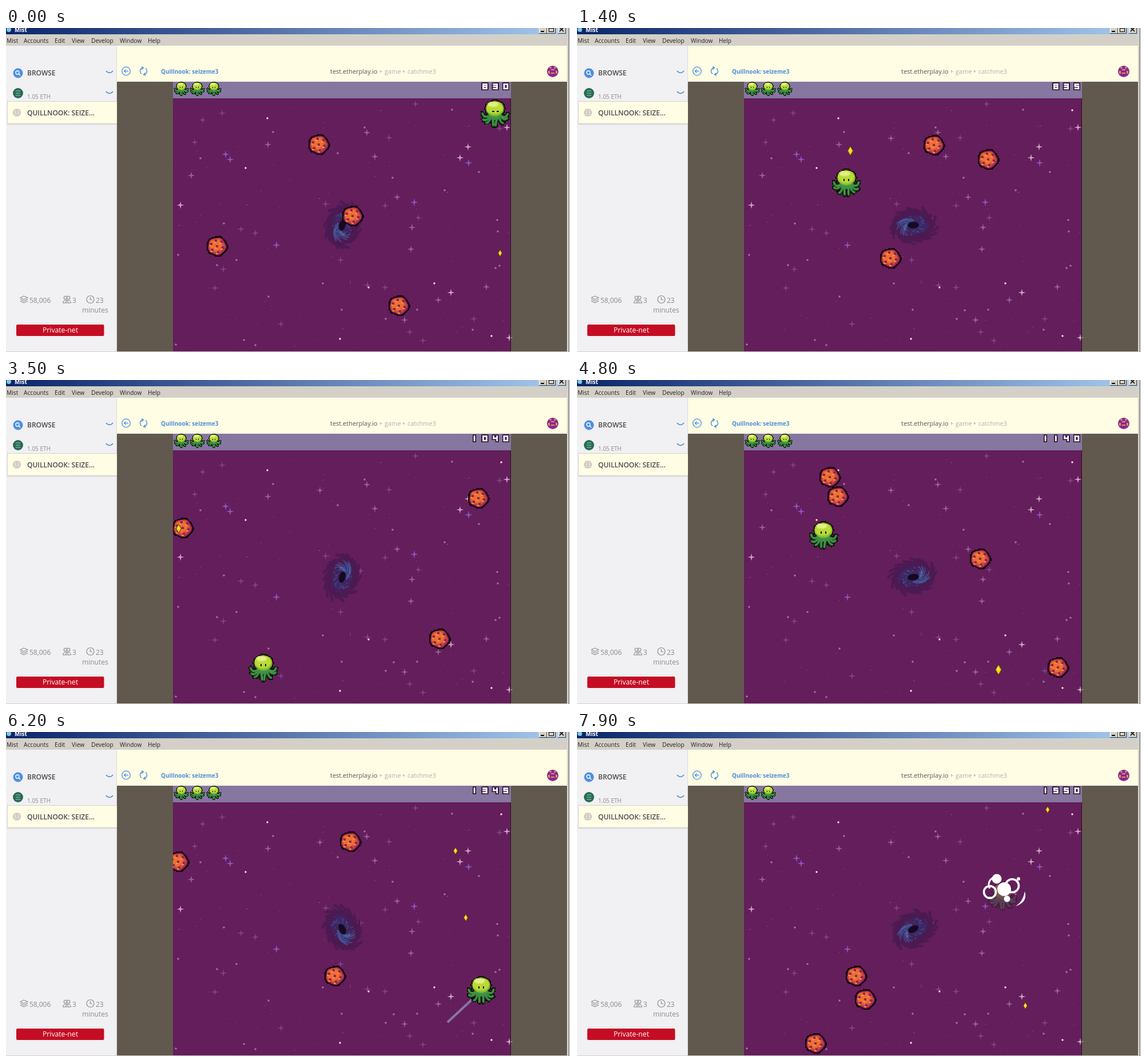
Recreate the animation shown at these times as an HTML page with a canvas. Size 988 by 567 pixels, loop 8 s.

```html
<!DOCTYPE html>
<html lang="en">
<head>
<meta charset="utf-8">
<title>Mist</title>
<style>
  html, body { margin: 0; width: 100%; height: 100%; overflow: hidden; background: #fff; }
  canvas, svg { position: absolute; left: 0; top: 0; width: 988px; height: 567px; }
  text { font-family: "Open Sans", "Noto Sans", sans-serif; white-space: pre; }
</style>
</head>
<body>
<canvas id="stage" width="988" height="567"></canvas>
<svg viewBox="0 0 988 567">
  <g font-size="10.2" fill="#222">
    <text x="15" y="7" font-weight="700" font-size="10" fill="#fff">Mist</text>
    <text x="1" y="26">Mist</text>
    <text x="31" y="26">Accounts</text>
    <text x="85" y="26">Edit</text>
    <text x="115" y="26">View</text>
    <text x="149" y="26">Develop</text>
    <text x="199" y="26">Window</text>
    <text x="248" y="26">Help</text>
  </g>
  <g font-size="12" font-weight="600" fill="#4a4a4e">
    <text x="37" y="83">BROWSE</text>
    <text x="37" y="153">QUILLNOOK: SEIZE…</text>
  </g>
  <g font-size="12" fill="#8d8a8a">
    <text x="37" y="124" font-size="10">1.05 ETH</text>
    <text x="41" y="480.5">58,006</text>
    <text x="116" y="480.5">3</text>
    <text x="157" y="480.5">23</text>
    <text x="133" y="498">minutes</text>
    <text x="64" y="533" font-size="12.2" fill="#fff">Private-net</text>
  </g>
  <g font-size="11">
    <text x="271" y="80" font-size="10" font-weight="700" fill="#4f8ad8">Quillnook: seizeme3</text>
    <text x="567" y="80" fill="#55555c">test.etherplay.io</text>
    <text x="662" y="80" fill="#b3aebb">game</text>
    <text x="702" y="80" fill="#b3aebb">catchme3</text>
  </g>
</svg>
<script>
const ctx = document.getElementById('stage').getContext('2d');
const TAU = Math.PI * 2;
const LOOP = 8000, STEP = 100;
const HOLE = { x: 588, y: 345 };

function layer(w, h, draw) {
  const c = document.createElement('canvas');
  c.width = w;
  c.height = h;
  draw(c.getContext('2d'));
  return c;
}

// Low-resolution sprite with hard pixel edges
function sprite(w, h, draw) {
  return layer(w, h, g => {
    draw(g);
    const img = g.getImageData(0, 0, w, h);
    for (let i = 3; i < img.data.length; i += 4) img.data[i] = img.data[i] > 110 ? 255 : 0;
    g.putImageData(img, 0, 0);
  });
}

function rect(g, color, x, y, w, h) {
  g.fillStyle = color;
  g.fillRect(x, y, w, h);
}

function disc(g, color, x, y, rx, ry = rx) {
  g.fillStyle = color;
  g.beginPath();
  g.ellipse(x, y, rx, ry, 0, 0, TAU);
  g.fill();
}

function line(g, color, width, ...pts) {
  g.strokeStyle = color;
  g.lineWidth = width;
  g.beginPath();
  for (let i = 0; i < pts.length; i += 2) g.lineTo(pts[i], pts[i + 1]);
  g.stroke();
}

function ring(g, color, width, x, y, r, a = 0, b = TAU) {
  g.strokeStyle = color;
  g.lineWidth = width;
  g.beginPath();
  g.arc(x, y, r, a, b);
  g.stroke();
}

function random(seed) {
  return () => (seed = (seed * 16807) % 2147483647) / 2147483647;
}

// ---- sprites ----
// Arm tips fan out over an ellipse, mirrored about the middle
function octopus(phase, blink) {
  return sprite(27, 25, g => {
    g.lineCap = 'round';
    const arms = (color, width) => {
      g.strokeStyle = color;
      g.lineWidth = width;
      for (const side of [-1, 1]) for (let i = 0; i < 4; i++) {
        const a = -0.2 + 0.55 * i + 0.07 * Math.sin(phase + i * 2 + side);
        const bend = a + 0.6 - 0.2 * i;
        g.beginPath();
        g.moveTo(13.5 + side * (5 - i), 14);
        g.quadraticCurveTo(13.5 + side * 10.5 * Math.cos(bend), 14 + 8 * Math.sin(bend),
          13.5 + side * 11.2 * Math.cos(a), 14 + 8.8 * Math.sin(a));
        g.stroke();
      }
    };
    arms('#0a0d08', 4);
    disc(g, '#0a0d08', 13.5, 8, 9.1, 7.8);
    disc(g, '#0a0d08', 13.5, 15, 7, 5);
    arms('#2f8148', 2.1);
    arms('#5fb03c', 0.8);
    disc(g, '#3c9347', 13.5, 14.6, 5.8, 3.4);
    disc(g, '#8cbf30', 13.5, 8.1, 8, 6.7);
    disc(g, '#b9da37', 13.2, 7.2, 7.4, 5.6);
    disc(g, '#e2ef82', 12, 4.2, 4.6, 2.3);
    for (const x of [11, 15]) rect(g, '#111', x, blink ? 10 : 9, blink ? 2 : 1, blink ? 1 : 2);
  });
}

const poses = [0, 1, 2, 3].map(i => octopus(i * TAU / 4));
const blinkPose = octopus(1, true);

const rock = sprite(20, 20, g => {
  const blob = (color, r, shift) => {
    g.fillStyle = color;
    g.beginPath();
    for (let a = 0; a < TAU; a += 0.2) {
      const k = r + 0.35 * Math.sin(5 * a + 1);
      g.lineTo(10 - shift + k * Math.cos(a), 10 - shift + k * Math.sin(a) * 0.96);
    }
    g.fill();
  };
  blob('#120510', 9.3, 0);
  blob('#a92f58', 7.9, 0);
  blob('#d94f3a', 6.9, 0.5);
  blob('#ee7030', 5.2, 1);
  for (let i = 0; i < 7; i++) {
    const a = i * TAU / 6 + 0.3, r = i < 6 ? 5.3 : 0;
    const x = Math.round(8.8 + r * Math.cos(a)), y = Math.round(8.8 + r * Math.sin(a));
    rect(g, '#8a2759', x, y, 2, 2);
    rect(g, '#f7943f', x - 1, y + 2, 2, 1);
  }
});

const hole = layer(100, 100, g => {
  const rnd = random(77);
  g.translate(50, 50);
  g.scale(1, 0.78);
  g.lineCap = 'round';
  const arm = (color, width, start, r0, r1, sweep) => {
    g.strokeStyle = color;
    g.lineWidth = width;
    g.beginPath();
    for (let k = 0; k <= 1.001; k += 0.1) {
      const a = start - sweep * k, r = r0 + (r1 - r0) * k;
      g.lineTo(r * Math.cos(a), r * Math.sin(a));
    }
    g.stroke();
  };
  disc(g, '#501b55', 0, 0, 36);
  for (let i = 0; i < 26; i++) arm('#4c1a52', 5, i * TAU / 26 + rnd() * 0.3, 20, 34 + rnd() * 10, 0.9);
  disc(g, '#41235f', 0, 0, 22);
  for (let i = 0; i < 40; i++) {
    const side = (i % 2) * Math.PI;
    arm(['#3a3576', '#3d4b8c', '#3a2a68', '#4a66a3'][i % 4], 1.1, side + rnd() * 1.7, 10, 16 + rnd() * 14, 1.1);
  }
  for (let i = 0; i < 30; i++) {
    const a = rnd() * TAU, r = 10 + rnd() * 13;
    rect(g, i % 4 ? '#5d86bd' : '#a9c9e4', r * Math.cos(a), r * Math.sin(a), 1.1, 1.3);
  }
  disc(g, '#150a20', 0, 0, 10, 7.2);
});

// ---- star field ----
function star(g, color, x, y, r) {
  g.fillStyle = color;
  g.beginPath();
  for (let i = 0; i < 8; i++) {
    const a = i * TAU / 8, k = i % 2 ? r * 0.27 : r;
    g.lineTo(x + k * Math.cos(a), y + k * Math.sin(a));
  }
  g.fill();
}

function space(g) {
  rect(g, '#641e5b', 292, 94, 591, 473);
  const rnd = random(4242);
  const scatter = (n, put) => {
    for (let i = 0; i < n; i++) put(Math.round(296 + rnd() * 582), Math.round(130 + rnd() * 430), i);
  };
  scatter(170, (x, y, i) => rect(g, ['#a12c5e', '#d8466a', '#87336f', '#943a6c'][i % 4], x, y, i % 5 ? 1 : 2, 1));
  scatter(32, (x, y, i) => star(g, i % 3 ? '#7d4287' : '#98609a', x, y, 6.5));
  scatter(26, (x, y) => disc(g, '#a56fa0', x, y, 1.8));
  scatter(8, (x, y) => {
    disc(g, '#d4436f', x, y, 2);
    disc(g, '#fff0f0', x, y, 1.4);
  });
  for (const [x, y] of [[384, 221], [392, 230], [809, 236], [714, 305], [473, 380]]) star(g, '#8a55bd', x, y, 7);
  for (const [x, y] of [[876, 174], [808, 208], [794, 227], [305, 310], [778, 463], [880, 542]]) star(g, '#cfa3c6', x, y, 6.5);
}

// ---- static window ----
function chevron(g, y) {
  g.strokeStyle = '#3f93d6';
  g.lineWidth = 1.5;
  g.beginPath();
  g.moveTo(175, y - 2);
  g.quadraticCurveTo(181, y + 5, 187, y - 2);
  g.stroke();
}

function windowButton(g, x, w) {
  rect(g, '#404040', x, -4, w, 14);
  rect(g, '#fff', x, -4, w - 1, 13);
  rect(g, '#d4d0c8', x + 1, -3, w - 2, 12);
}

function sidebar(g) {
  rect(g, '#f1f0f2', 0, 31, 194, 536);
  rect(g, '#dfdce0', 193, 31, 1, 536);

  disc(g, '#4b90e2', 21, 79, 8.5);
  ring(g, '#fff', 1.3, 20, 78, 3);
  line(g, '#fff', 1.5, 22, 80, 25, 83);
  disc(g, '#2c6a53', 21, 114, 9);
  for (const y of [109, 113, 117]) rect(g, '#5ba088', 17, y, 8, 2);
  chevron(g, 77);
  chevron(g, 113);

  rect(g, '#d3d0d8', 2, 128, 192, 41);
  rect(g, '#fffde4', 3, 129, 191, 38);
  disc(g, '#c2c0bd', 19, 148, 7);
  for (const k of [-3, 0, 3]) line(g, '#f6f4e0', 0.8, 13, 148 + k, 25, 148 + k);
  g.beginPath();
  g.ellipse(19, 148, 3, 7, 0, 0, TAU);
  g.stroke();

  const ink = '#8d8a8a';
  line(g, ink, 1.1, 25, 472, 31, 469, 38, 472, 31, 475, 25, 472);
  for (const y of [475, 478]) line(g, ink, 1.1, 25, y, 31, y + 3, 38, y);
  for (const x of [109, 104]) {
    ring(g, ink, 1.1, x, 472, 2.8);
    ring(g, ink, 1.1, x, 481, 4.5, Math.PI, TAU);
  }
  line(g, ink, 1.1, 99, 481, 114, 481);
  ring(g, ink, 1.2, 147.5, 475, 6.5);
  line(g, ink, 1.2, 147.5, 471, 147.5, 475.5, 151, 475.5);

  g.fillStyle = '#c40d24';
  g.beginPath();
  g.roundRect(18, 519, 153.5, 20, 2);
  g.fill();
}

function toolbar(g) {
  rect(g, '#fffde4', 194, 31, 787, 63);
  const blue = '#4a8fe0';
  ring(g, blue, 1.3, 210, 75.5, 7.3);
  line(g, blue, 1.3, 214, 75.5, 206.5, 75.5);
  line(g, blue, 1.3, 209.5, 72.5, 206.5, 75.5, 209.5, 78.5);
  for (const s of [1, -1]) {
    const turn = s > 0 ? 0 : Math.PI;
    ring(g, blue, 1.4, 240.5, 75.5, 6, 2.2 + turn, 4.6 + turn);
    line(g, blue, 1.4, 240.5 - 3.5 * s, 75.5 - 8 * s, 240.5, 75.5 - 6 * s, 240.5 - 3 * s, 75.5 - 3 * s);
  }
  g.fillStyle = '#c5c0cc';
  for (const x of [654, 694]) {
    g.beginPath();
    g.moveTo(x, 73.5);
    g.lineTo(x + 4, 76);
    g.lineTo(x, 78.5);
    g.fill();
  }
  disc(g, '#8a2a86', 956, 76, 10);
  for (const s of [-1, 1]) {
    rect(g, '#e08a76', 954.5 + s * 4, 68, 3, 3);
    rect(g, '#e08a76', 954.5 + s * 6.5, 75, 3, 5);
    rect(g, '#e08a76', 953, 75 + s * 3, 6, 2);
  }
}

const backdrop = layer(988, 567, g => {
  rect(g, '#fff', 0, 0, 988, 567);
  const title = g.createLinearGradient(0, 0, 981, 0);
  title.addColorStop(0, '#0a246a');
  title.addColorStop(1, '#a6caf0');
  rect(g, title, 0, 0, 981, 11);
  rect(g, '#d4d0c8', 0, 11, 981, 20);
  rect(g, '#d4d0c8', 981, 0, 3, 567);
  rect(g, '#505050', 984, 0, 1, 567);
  disc(g, '#7fc4e8', 5, 3, 4);
  windowButton(g, 932, 14);
  windowButton(g, 946, 15);
  windowButton(g, 965, 14);
  rect(g, '#000', 935, 5, 6, 2);
  rect(g, '#000', 949, -1, 9, 8);
  rect(g, '#d4d0c8', 950, 1, 7, 5);
  line(g, '#000', 1.6, 968, -1, 975, 6);
  line(g, '#000', 1.6, 975, -1, 968, 6);
  sidebar(g);
  toolbar(g);
  rect(g, '#61594e', 194, 94, 787, 473);
  space(g);
  rect(g, '#2a1028', 882, 94, 1, 473);
  rect(g, '#d4d0c8', 0, 566, 984, 1);
});

// ---- motion ----
const DEATH = 7.8;

// Rocks drift straight and bounce off the walls; later ones leave the hole
const ROCKS = [
  { x: 547, y: 204, vx: 57, vy: -105.5, from: 0, to: 5.7 },
  { x: 606, y: 329, vx: 83, vy: -72.7, from: 0, to: 9 },
  { x: 369, y: 382, vx: 117, vy: 139, from: 0, to: 1.15 },
  { x: 687, y: 486, vx: -102, vy: -61.2, from: 0, to: DEATH },
  { ...HOLE, vx: -98.5, vy: -105, from: 3.6, to: 9 },
  { ...HOLE, vx: -82, vy: 119, from: 6.98, to: 9 }
];

// Each gem lasts until the swimmer reaches it
const GEMS = [
  { x: 864, y: 394, from: 0, to: 1 },
  { x: 478, y: 215, from: 1.1, to: 2 },
  { x: 454, y: 498, from: 2.1, to: 3.4 },
  { x: 302, y: 260, from: 3.4, to: 4.6 },
  { x: 737, y: 507, from: 4.6, to: 5.6 },
  { x: 786, y: 208, from: 5.7, to: 7.2 },
  { x: 804, y: 325, from: 5.9, to: 6.6 },
  { x: 823, y: 136, from: 6.7, to: 9 },
  { x: 784, y: 479, from: 7.2, to: 9 }
];

// Seconds, x, y
const SWIM = [
  [0, 855, 150], [1.4, 471, 271], [1.9, 476, 236], [2.3, 500, 200], [3.5, 450, 504], [4.5, 325, 262],
  [4.8, 431, 272], [5.8, 750, 520], [6.2, 831, 452], [7.2, 787, 218], [8, 745, 286]
];
const CATCHES = [2, 3.4, 4.5, 5.6, 6, 6.6, 7.2];

const alive = t => o => t >= o.from && t < o.to;

// Game time starts a little slow, then runs fast
const pace = t => 1.12 * t - 0.21 * Math.min(t, 1);

function bounce(v, lo, hi) {
  const span = hi - lo, m = (((v - lo) % (2 * span)) + 2 * span) % (2 * span);
  return lo + (m > span ? 2 * span - m : m);
}

function drawRock(r, t) {
  const age = pace(t) - pace(r.from);
  stamp(rock, bounce(r.x + r.vx * age, 301, 870), bounce(r.y + r.vy * age, 133, 555));
}

function swimmer(t) {
  const i = SWIM.findIndex(p => p[0] > t);
  const [t0, x0, y0] = SWIM[i - 1], [t1, x1, y1] = SWIM[i];
  const k = (t - t0) / (t1 - t0);
  return [x0 + (x1 - x0) * k, y0 + (y1 - y0) * k];
}

function points(t) {
  const bonus = Math.floor((t + 1.11) / 2.2);
  return 830 + 100 * CATCHES.filter(c => c <= t).length + 5 * bonus;
}

function stamp(s, x, y, scale = 2) {
  const w = s.width * scale, h = s.height * scale;
  ctx.drawImage(s, Math.round(x - w / 2), Math.round(y - h / 2), w, h);
}

function drawGem({ x, y }, t) {
  const s = 0.65 + 0.2 * (1 - Math.cos(t * Math.PI));
  const part = (color, w, h) => {
    ctx.fillStyle = color;
    ctx.beginPath();
    ctx.moveTo(x, y - h * s);
    ctx.lineTo(x + w * s, y);
    ctx.lineTo(x, y + h * s);
    ctx.lineTo(x - w * s, y);
    ctx.fill();
  };
  part('#4a3208', 6.4, 9.8);
  part('#c79a12', 5.2, 8.4);
  part('#f5dc22', 3.6, 7);
  rect(ctx, '#fdf48a', x - 1.5, y - 3 * s, 1.5, 3 * s);
}

// Segment bits: top, upper right, lower right, bottom, lower left, upper left, middle
const DIGITS = [63, 6, 91, 79, 102, 109, 125, 7, 127, 111];

function digit(d) {
  const L = 3, R = 9, T = 3, M = 6.5, B = 10.5;
  const segments = [[L, T, R, T], [R, T, R, M], [R, M, R, B], [L, B, R, B], [L, M, L, B], [L, T, L, M], [L, M, R, M]];
  for (const [color, width] of [['#2e0f33', 6], ['#fff', 2.6]])
    segments.forEach((s, i) => { if (DIGITS[d] >> i & 1) line(ctx, color, width, ...s); });
}

function drawScore(n) {
  const s = String(n);
  ctx.lineCap = 'square';
  [...s].forEach((d, i) => {
    ctx.save();
    ctx.translate(868 - (s.length - 1 - i) * 18.3 - (d === '1' ? 3 : 0), 95.5);
    digit(d);
    ctx.restore();
  });
  ctx.lineCap = 'butt';
}

function burst() {
  ctx.globalAlpha = 0.3;
  stamp(poses[1], 744, 288);
  ctx.globalAlpha = 1;
  ctx.save();
  ctx.translate(747, 275);
  for (const [x, y, r] of [[-13, -18, 8.5], [0, 0, 12], [5, 17, 5.5], [25, -18, 3]]) disc(ctx, '#fff', x, y, r);
  ring(ctx, '#fff', 3.6, -25, 5, 10.5);
  ring(ctx, '#fff', 3.6, 14, -6, 11.5);
  ring(ctx, '#fff', 3, -14, -8, 13, 2.6, 4.2);
  ctx.fillStyle = '#fff';
  ctx.beginPath();
  ctx.moveTo(36, 4);
  ctx.quadraticCurveTo(42, 22, 20, 30);
  ctx.quadraticCurveTo(33, 22, 36, 4);
  ctx.fill();
  ctx.restore();
}

function draw(t) {
  ctx.imageSmoothingEnabled = false;
  ctx.drawImage(backdrop, 0, 0);

  ctx.save();
  ctx.beginPath();
  ctx.rect(292, 123, 590, 443);
  ctx.clip();

  ctx.save();
  ctx.imageSmoothingEnabled = true;
  ctx.translate(HOLE.x, HOLE.y);
  ctx.rotate((t - 1.45) * 0.9);
  ctx.drawImage(hole, -50, -50);
  ctx.restore();

  ROCKS.filter(alive(t)).forEach(r => drawRock(r, t));
  GEMS.filter(alive(t)).forEach(g => drawGem(g, t));

  if (t >= DEATH) burst();
  else {
    const [x, y] = swimmer(t);
    // Dash trail
    if (t > 6.05 && t < 6.25) line(ctx, '#8677a4', 4, 772, 508, x - 15, y + 15);
    stamp(t < 0.1 ? blinkPose : poses[Math.floor(t * 5 + 0.01) % 4], x, y);
  }
  ctx.restore();

  rect(ctx, '#8677a0', 292, 94, 591, 29);
  const lives = t >= DEATH ? 2 : 3;
  for (let i = 0; i < lives; i++) stamp(poses[1], 306 + i * 28.7, 106, 1);
  drawScore(points(t));
}

function tick(now) {
  draw(Math.floor(now % LOOP / STEP) * STEP / 1000);
  requestAnimationFrame(tick);
}
requestAnimationFrame(tick);
</script>
</body>
</html>
```
